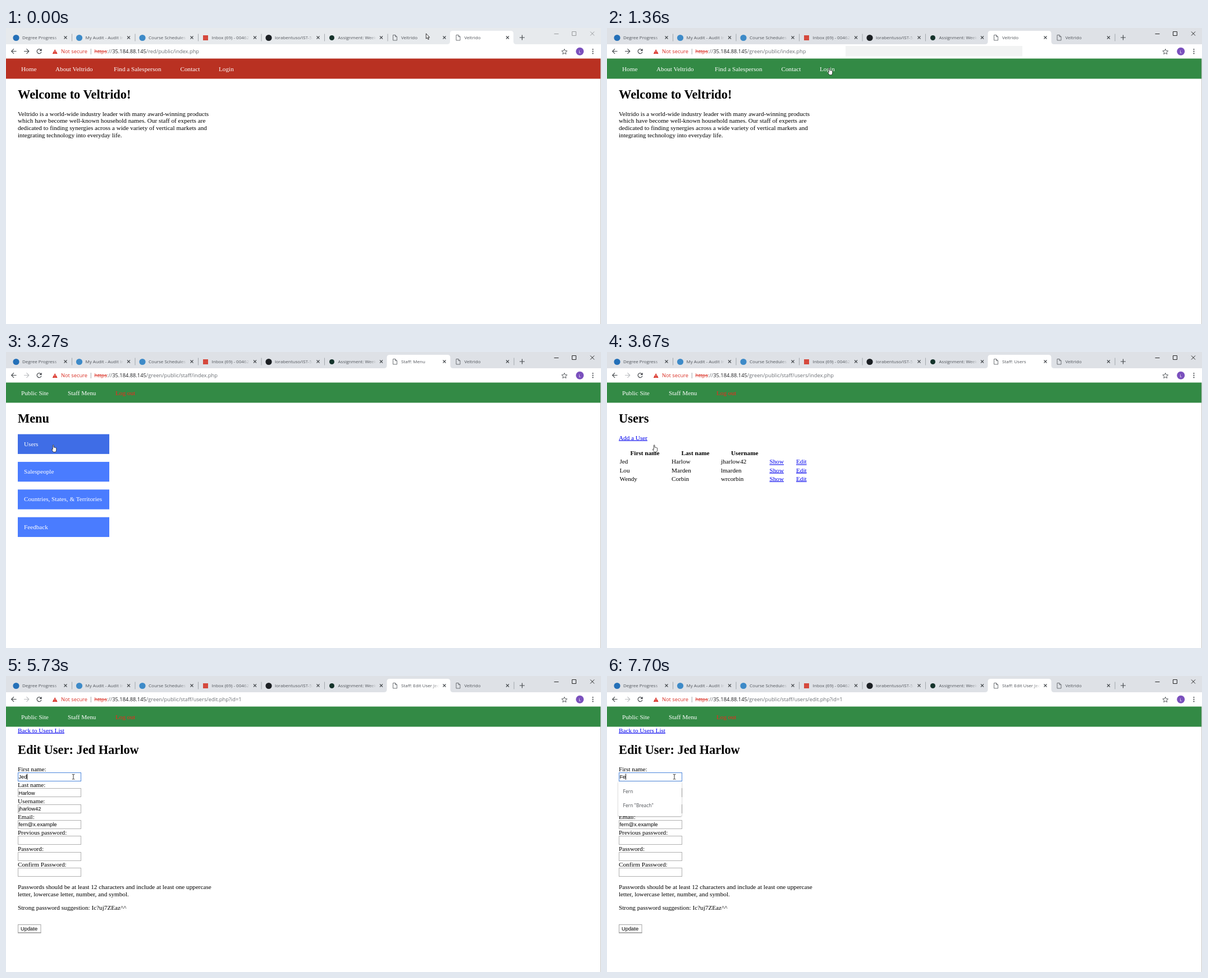
Write an HTML page that moves like this. It is 1060 px wide and 528 px high and loops after 8 s.

```html
<!DOCTYPE html>
<html lang="en">
<head>
<meta charset="utf-8">
<title>Staff pages</title>
<style>
  html, body { margin: 0; width: 100%; height: 100%; overflow: hidden; background: #fff; }
  svg { display: block; }
  text { white-space: pre; }
  .ui { font-family: "Open Sans", "Noto Sans", sans-serif; }
  .serif { font: 11.2px "Liberation Serif", "Times New Roman", serif; }
  .h1 { font-size: 22.4px; font-weight: bold; }
  .bold { font-weight: bold; }
  .link { fill: #0000ee; text-decoration: underline; }
  .field { font: 9.33px "Liberation Sans", Arial, sans-serif; }
</style>
</head>
<body>
<svg id="stage" width="1060" height="528" viewBox="0 0 1060 528"></svg>
<script>
const LOOP = 8000, PITCH = 112.5;
const stage = document.getElementById('stage');

function add(parent, tag, attrs = {}, content) {
  const el = document.createElementNS('http://www.w3.org/2000/svg', tag);
  for (const k in attrs) el.setAttribute(k, attrs[k]);
  if (content !== undefined) el.textContent = content;
  parent.appendChild(el);
  return el;
}
const group = (parent, attrs) => add(parent, 'g', attrs);
const rect = (p, x, y, width, height, fill, more) => add(p, 'rect', { x, y, width, height, fill, ...more });
const line = (p, d, stroke, w = 1, more) => add(p, 'path', { d, stroke, 'stroke-width': w, fill: 'none', ...more });
const dot = (p, cx, cy, r, fill) => add(p, 'circle', { cx, cy, r, fill });
const serif = (p, x, y, s, cls = '', fill = '#000') => add(p, 'text', { x, y, class: 'serif ' + cls, fill }, s);
const ui = (p, x, y, size, s, fill) => add(p, 'text', { x, y, class: 'ui', 'font-size': size, fill }, s);
const show = (el, on) => { el.style.display = on ? '' : 'none'; };

// Tab titles fade out before the close button
const defs = add(stage, 'defs');
const fade = add(defs, 'linearGradient', { id: 'fade', gradientUnits: 'userSpaceOnUse', x1: 84, x2: 97, y1: 0, y2: 0 });
[[0, 1], [1, 0]].forEach(([offset, o]) => add(fade, 'stop', { offset, 'stop-color': '#50545a', 'stop-opacity': o }));

rect(stage, 0, 0, 1060, 528, '#fff');

// Title bar and tabs
const bar = rect(stage, 0, 0, 1060, 29, '#dee1e6');
const activeTab = add(stage, 'path', {
  d: 'M-5 29Q0 29 0 24V10Q0 5 5 5H108Q113 5 113 10V24Q113 29 118 29Z', fill: '#fff'
});
const tabTitles = ['Degree Progress', 'My Audit - Audit Info', 'Course Schedules -', 'Inbox (69) - 00462',
  'lorabentuso/IST-52', 'Assignment: Week 9', 'Veltrido', 'Veltrido'];
const icons = [
  g => dot(g, 18, 17.5, 5.6, '#2470b8'),
  g => dot(g, 18, 17.5, 5.6, '#3d8ac8'),
  g => dot(g, 18, 17.5, 5.6, '#3d8ac8'),
  g => rect(g, 13.5, 13, 9, 9, '#d5493d'),
  g => dot(g, 18, 17.5, 5.6, '#1b1f23'),
  g => dot(g, 18, 17.5, 4.5, '#15332b')
];
const pageIcon = g => line(g, 'M14.5 12.5H18.5L21.5 15.5V22H14.5ZM18.5 12.5V15.5H21.5', '#5f6368', 0.9);
const titles = [], seps = [];
tabTitles.forEach((s, i) => {
  const g = group(stage, { transform: `translate(${PITCH * i} 0)` });
  (icons[i] || pageIcon)(g);
  titles.push(ui(g, 29, 20, 8, s, 'url(#fade)'));
  line(g, 'M103.5 14.5l5 5m0-5l-5 5', '#45494d', 1.1);
  seps.push(line(g, 'M117.5 10.5V23.5', '#93979c', 0.8));
});
line(stage, 'M915 17H924M919.5 12.5V21.5', '#45494d', 1.2);
const controls = line(stage, 'M976.5 10.5H984.5M1008.5 6.5H1015.5V13.5H1008.5ZM1041 6.5l7 7m0-7l-7 7', '#000', 0.9);

// Toolbar
rect(stage, 0, 29, 1060, 25.5, '#fff');
const hover = rect(stage, 425, 32, 315, 18.5, '#f2f3f3');
const arrow = (x, flip, c) => line(stage, 'M4.5 0H-4M0 -4.3L-4.3 0L0 4.3', c, 1.2,
  { transform: `translate(${x} 41.5) scale(${flip} 1)` });
arrow(14, 1, '#45494d');
const forward = arrow(36.5, -1, '#45494d');
line(stage, 'M62.2 39A4 4 0 1 0 63 42.7', '#45494d', 1.2);
add(stage, 'path', { d: 'M63.6 36.8V41H59.4Z', fill: '#45494d' });
add(stage, 'path', { d: 'M87.2 38L91.7 46H82.7Z', fill: '#d93025' });
line(stage, 'M87.2 40.7V43.2M87.2 44V45', '#fff', 0.9);
ui(stage, 98, 45.2, 9.3, 'Not secure', '#d93025');
line(stage, 'M151.3 37V47', '#9a9da1', 0.9);
const url = ui(stage, 157.5, 45.2, 9.3, undefined, '#6a6e73');
add(url, 'tspan', { fill: '#d93025', 'text-decoration': 'line-through' }, 'https');
add(url, 'tspan', {}, '://');
add(url, 'tspan', { fill: '#202124' }, '35.184.88.145');
const path = add(url, 'tspan', {}, '');
line(stage, 'M994.8 37.4l1.4 3.2 3.5.3-2.7 2.3.8 3.4-3-1.8-3 1.8.8-3.4-2.7-2.3 3.5-.3Z', '#45494d', 0.9);
dot(stage, 1022.3, 41.8, 7, '#7a50bd');
add(stage, 'text', { x: 1022.3, y: 44.6, class: 'ui', 'font-size': 7.5, fill: '#fff', 'text-anchor': 'middle' }, 'L');
[38, 41.7, 45.4].forEach(y => dot(stage, 1045.5, y, 1.1, '#45494d'));

// Page header
const nav = rect(stage, 0, 54.5, 1059, 36, '#338a45');
function menuBar(items) {
  const g = group(stage);
  items.forEach(([x, s, fill = '#fff']) => serif(g, x, 77, s, '', fill));
  return g;
}
const publicNav = menuBar([[27, 'Home'], [88, 'About Veltrido'], [192, 'Find a Salesperson'], [310.5, 'Contact'], [379, 'Login']]);
const staffNav = menuBar([[27, 'Public Site'], [110, 'Staff Menu'], [195, 'Log out', '#f8241c']]);

const pages = { home: group(stage), menu: group(stage), users: group(stage), edit: group(stage) };
const heading = (p, s, y = 125.6) => serif(p, 21, y, s, 'h1');

heading(pages.home, 'Welcome to Veltrido!');
['Veltrido is a world-wide industry leader with many award-winning products',
  'which have become well-known household names. Our staff of experts are',
  'dedicated to finding synergies across a wide variety of vertical markets and',
  'integrating technology into everyday life.'
].forEach((s, i) => serif(pages.home, 21, 156.5 + 12.88 * i, s));

heading(pages.menu, 'Menu');
const buttons = ['Users', 'Salespeople', 'Countries, States, & Territories', 'Feedback'].map((s, i) => {
  const y = 146.6 + 49.35 * i;
  const box = rect(pages.menu, 21, y, 163, 35.3, '#4a7cff');
  serif(pages.menu, 32, y + 21.1, s, '', '#fff');
  return box;
});

heading(pages.users, 'Users');
serif(pages.users, 21, 156.5, 'Add a User', 'link');
[[41.5, 'First name'], [132.5, 'Last name'], [221, 'Username']].forEach(([x, s]) => serif(pages.users, x, 184.2, s, 'bold'));
[['Jed', 'Harlow', 'jharlow42'], ['Lou', 'Marden', 'lmarden'], ['Wendy', 'Corbin', 'wrcorbin']].forEach((row, r) => {
  const y = 199.4 + 15.1 * r;
  [22.5, 115, 203].forEach((x, c) => serif(pages.users, x, y, row[c]));
  serif(pages.users, 289.5, y, 'Show', 'link');
  serif(pages.users, 337, y, 'Edit', 'link');
});

serif(pages.edit, 21, 100.6, 'Back to Users List', 'link');
heading(pages.edit, 'Edit User: Jed Harlow', 138.6);
const inputs = [['First name:', 'Jed'], ['Last name:', 'Harlow'], ['Username:', 'jharlow42'], ['Email:', 'fern@x.example'],
  ['Previous password:', ''], ['Password:', ''], ['Confirm Password:', '']].map(([label, value], i) => {
  const y = 28.35 * i;
  serif(pages.edit, 21, 169.8 + y, label);
  const box = rect(pages.edit, 21.5, Math.round(172 + y) + 0.5, 112, 15, '#fff', { stroke: '#b0b0b0' });
  const text = add(pages.edit, 'text', { x: 22.4, y: 183.2 + y, class: 'field' }, value);
  return { box, text };
});
serif(pages.edit, 21, 379.8, 'Passwords should be at least 12 characters and include at least one uppercase');
serif(pages.edit, 21, 392.6, 'letter, lowercase letter, number, and symbol.');
serif(pages.edit, 21, 416.6, 'Strong password suggestion: Ic?uj7ZEaz^^');
rect(pages.edit, 21.5, 443.5, 40.5, 14.5, '#fdfdfd', { stroke: '#a6a6a6' });
line(pages.edit, 'M21 458H62.5', '#8a8a8a');
add(pages.edit, 'text', { x: 26, y: 453.8, class: 'field' }, 'Update');

const caret = rect(stage, 0, 174.5, 0.9, 10.5, '#000');
const popup = group(stage, { style: 'filter: drop-shadow(0 1px 1.2px rgba(0,0,0,.35))' });
const popupBox = rect(popup, 20, 188, 113, 62, '#fff', { rx: 2 });
const options = [209, 234.3].map(y => ui(popup, 28.5, y, 8.5, '', '#4c4f54'));

rect(stage, 1059, 54.5, 1, 474, '#c4c4c4');

// Pointers
const pointers = { arrow: group(stage), hand: group(stage), beam: group(stage) };
add(pointers.arrow, 'path', { d: 'M.4 .4V9.6L2.5 7.7L4 11L5.4 10.4L4 7.2H6.6Z', fill: '#fff', stroke: '#000', 'stroke-width': 0.8 });
add(pointers.hand, 'path', {
  d: 'M2.3 1.3Q3.2 .3 4 1.3V5Q6.4 5 8.7 6.3V9.6Q8.4 12 7.3 13.5H3.5Q1.2 10.6 .4 8.6Q.7 7.5 2.3 8.9Z',
  fill: '#fff', stroke: '#222', 'stroke-width': 0.8
});
line(pointers.beam, 'M.5 .5H2L2.8 1.2L3.6 .5H5.1M2.8 1V8.6M.5 9.1H2L2.8 8.4L3.6 9.1H5.1', '#222', 0.9);

const matchF = ['Fern', 'Fern "Breach"'];
// Each step changes only the listed parts of the state
const steps = [
  [0, { tab: 7, focus: false, path: '/red/public/index.php', title: 'Veltrido', nav: '#b93122', page: 'home',
    hover: false, lit: false, back: true, value: 'Jed', editing: false, caret: false, options: [], at: ['arrow', 748, 9.5] }],
  [150, { tab: 6, focus: true, path: '/green/public/index.php' }],
  [300, { nav: '#338a45', at: ['arrow', 748, 12] }],
  [580, { at: ['arrow', 744, 18] }],
  [710, { at: ['arrow', 718, 27] }],
  [840, { at: ['beam', 645, 37], hover: true }],
  [970, { at: ['beam', 545, 44] }],
  [1100, { at: ['arrow', 455, 58] }],
  [1230, { at: ['hand', 404, 68] }],
  [1360, { at: ['hand', 393, 70.3] }],
  [2020, { path: '/green/public/staff/index.php', title: 'Staff: Menu', back: false }],
  [2155, { page: 'menu', hover: false }],
  [3000, { at: ['arrow', 240, 112] }],
  [3270, { at: ['hand', 81, 165], lit: true }],
  [3550, { path: '/green/public/staff/users/index.php', title: 'Staff: Users' }],
  [3670, { page: 'users', lit: false }],
  [3820, { at: ['arrow', 118, 170] }],
  [3955, { at: ['arrow', 205, 181] }],
  [4090, { at: ['arrow', 285, 189] }],
  [4225, { at: ['hand', 338, 193] }],
  [4360, { at: ['hand', 353, 193] }],
  [4760, { path: '/green/public/staff/users/edit.php?id=1', title: 'Staff: Edit User Jed H' }],
  [4880, { page: 'edit' }],
  [5030, { at: ['arrow', 335, 191] }],
  [5170, { at: ['arrow', 270, 187] }],
  [5310, { at: ['arrow', 195, 181] }],
  [5450, { at: ['arrow', 140, 177] }],
  [5590, { at: ['beam', 117.2, 175] }],
  [5730, { editing: true, caret: true }],
  [5850, { options: ['Jed'] }],
  [6290, { caret: false }],
  [6590, { value: 'Je', caret: true }],
  [6710, { value: 'J', options: ['Jed', 'Jonas'] }],
  [6980, { value: '', options: [] }],
  [7390, { value: 'F' }],
  [7520, { options: matchF }],
  [7700, { value: 'Fe' }]
];

function draw(s) {
  bar.setAttribute('fill', s.focus ? '#dee1e6' : '#e7eaed');
  controls.setAttribute('stroke', s.focus ? '#111' : '#8f9193');
  activeTab.setAttribute('transform', `translate(${3.5 + PITCH * s.tab} 0)`);
  seps.forEach((el, i) => show(el, i !== s.tab && i + 1 !== s.tab));
  titles[6].textContent = s.title;
  path.textContent = s.path;
  forward.setAttribute('stroke', s.back ? '#45494d' : '#bcbec1');
  show(hover, s.hover);
  nav.setAttribute('fill', s.nav);
  show(publicNav, s.page === 'home');
  show(staffNav, s.page !== 'home');
  for (const name in pages) show(pages[name], name === s.page);
  buttons[0].setAttribute('fill', s.lit ? '#3f6de6' : '#4a7cff');

  const { box, text } = inputs[0];
  box.setAttribute('stroke', s.editing ? '#4b86dc' : '#b0b0b0');
  text.textContent = s.value;
  show(caret, s.caret);
  if (s.caret) caret.setAttribute('x', 22.2 + (s.value ? text.getComputedTextLength() : 0));
  show(popup, s.options.length > 0);
  popupBox.setAttribute('height', 12 + 25 * s.options.length);
  options.forEach((el, i) => { el.textContent = s.options[i] || ''; });

  const [kind, x, y] = s.at;
  for (const name in pointers) show(pointers[name], name === kind);
  pointers[kind].setAttribute('transform', `translate(${x} ${y})`);
}

let last = 0;
const start = performance.now();
function tick() {
  const t = (performance.now() - start) % LOOP;
  const past = steps.filter(([at]) => at <= t);
  if (past.length !== last) {
    last = past.length;
    draw(Object.assign({}, ...past.map(([, change]) => change)));
  }
  requestAnimationFrame(tick);
}
tick();
</script>
</body>
</html>
```
